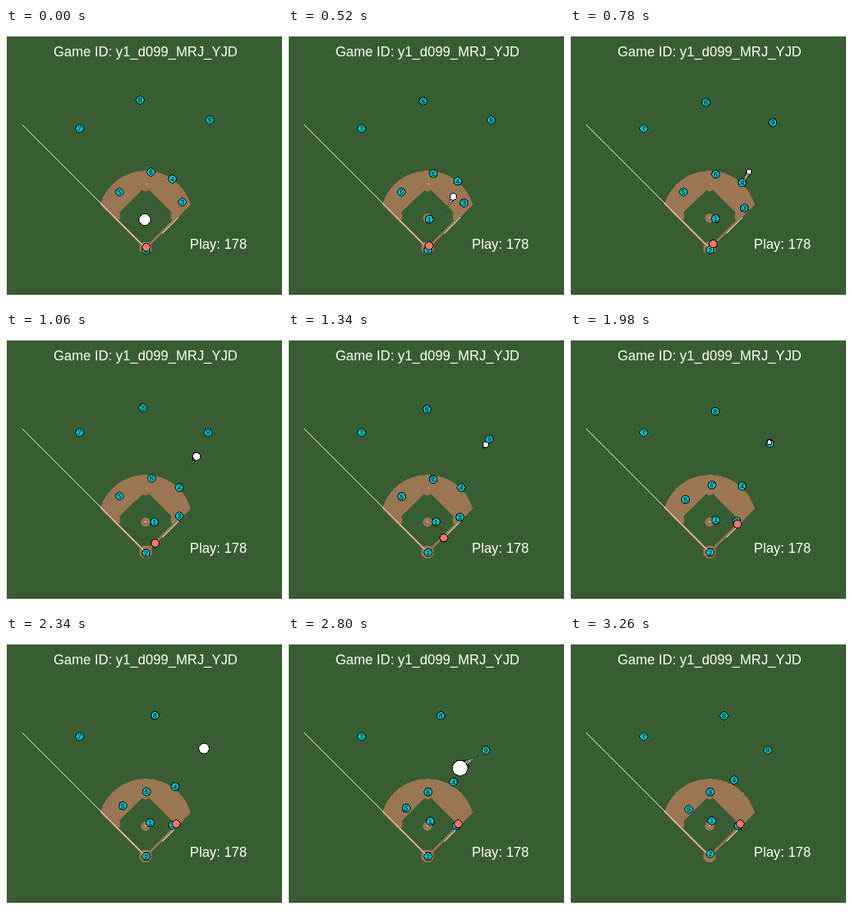
An HTML page that plays this animation: 360x360 px, repeating every 3.3 s.

```html
<!DOCTYPE html>
<html lang="en">
<head>
<meta charset="utf-8">
<title>Play 178</title>
<style>
  html, body { margin: 0; width: 100%; height: 100%; overflow: hidden; background: #fff; }
  svg { display: block; width: 100%; height: 100%; shape-rendering: crispEdges; }
  text { font-family: "Liberation Sans", Arial, sans-serif; text-anchor: middle; }
  .label { font-size: 17.85px; fill: #fff; }
  .dirt { fill: #9b7653; }
  .grass { fill: #395d33; }
  .chalk { stroke: #fff; fill: none; }
  .base { fill: #fff; }
  .man circle { fill: #00bfc4; stroke: #000; }
  .man.runner circle { fill: #f8766d; }
  .man text { font-size: 9px; }
  .ball { fill: #fff; stroke: #000; }
</style>
</head>
<body>
<svg viewBox="0 0 360 360">
  <clipPath id="infield"><path d="M123 230.4A61.5 61.5 0 0 1 241 230.4L182 289.4Z"/></clipPath>
  <rect class="grass" x="1" y="11" width="359" height="337"/>
  <path class="dirt" d="M123 230.4A61.5 61.5 0 0 1 241 230.4L182 289.4Z"/>
  <path class="grass" d="M182 207L221.2 246.2L182 285.4L142.8 246.2Z"/>
  <g class="dirt">
    <g clip-path="url(#infield)">
      <circle cx="182" cy="204.3" r="8.5"/>
      <circle cx="223.4" cy="245.6" r="8.5"/>
      <circle cx="140.6" cy="245.6" r="8.5"/>
    </g>
    <circle cx="182" cy="287" r="8.5"/>
    <circle cx="182" cy="248" r="6"/>
  </g>
  <path class="chalk" d="M21 126L182 287M204 268L225 247"/>
  <g class="base">
    <rect x="181" y="247" width="2" height="1"/>
    <rect x="183" y="203" width="1" height="1"/>
  </g>
  <text class="label" x="182" y="37">Game ID: y1_d099_MRJ_YJD</text>
  <text class="label" x="277" y="288">Play: 178</text>
  <g id="men"></g>
  <g id="flight"></g>
</svg>
<script>
const LOOP = 3300, STEP = 20, WAKE = 9;
const HIT = 130, CATCH = 1620, THROW = 2540, LAND = 3120, GONE = 3180;

const progress = (t, from, to) => Math.min(1, Math.max(0, (t - from) / (to - from)));
const ease = u => u * u * (3 - 2 * u);
const mix = (a, b, u) => a + (b - a) * u;

function make(parent, tag, attrs, text) {
  const el = document.createElementNS("http://www.w3.org/2000/svg", tag);
  for (const k in attrs) el.setAttribute(k, attrs[k]);
  if (text) el.textContent = text;
  return parent.appendChild(el);
}

// Each move is [from, to, dx, dy]; overlapping moves add up
const men = [];
function addMan(label, x, y, ...moves) {
  const g = make(document.getElementById("men"), "g", { class: label ? "man" : "man runner" });
  make(g, "circle", { r: 5.2 });
  if (label) make(g, "text", { y: 3.2 }, label);
  men.push({ g, x, y, moves });
}

addMan("1", 182, 250, [300, 1060, 11.5, -2], [1060, 3200, -8.5, -7]);
addMan("2", 182.5, 290, [520, 1500, 0.5, -2.5], [2800, 3200, 0, -3.5]);
addMan("3", 230, 227, [400, 1060, -4, 13], [1060, 2000, -8.5, 7], [2340, 2800, 2, 0.5]);
addMan("4", 217, 197, [0, 1060, 9, 6], [1620, 3200, -12, -15]);
addMan("5", 148, 214, [1060, 3260, 7, 12]);
addMan("6", 189, 188, [0, 900, 1, 3], [1060, 2500, -7, 12.5]);
addMan("7", 96, 131);
addMan("8", 175, 94, [0, 2000, 7, 9], [1060, 3200, 19, 1]);
addMan("9", 266, 120, [0, 520, -1, 0], [520, 1620, -3, 23], [1620, 2500, -4, 6]);
addMan("", 183, 286, [0, 520, 1, -2], [520, 1800, 27, -22], [1400, 2340, 11, -17]);

// Position and height-based radius: pitch, bouncing hit, carry, throw to second
function ballAt(t) {
  if (t < HIT) {
    const u = progress(t, 0, HIT);
    return [mix(181, 183, u), mix(250, 285, u), mix(7.5, 5, u)];
  }
  if (t < CATCH) {
    const u = progress(t, HIT, CATCH), s = 1 - (1 - u) ** 2;
    const bounce = Math.abs(Math.sin(3.3 * Math.PI * (1 - s)));
    return [mix(183, 261, s) - 12 * s * (1 - s), mix(285, 142, s), 3 + 2.2 * bounce];
  }
  if (t < THROW) {
    const u = ease(progress(t, CATCH, THROW));
    return [mix(261, 258, u), mix(142, 147.5, u), mix(3, 7, ease(progress(t, 2160, 2360)))];
  }
  const u = progress(t, THROW, LAND);
  return [mix(258, 183, u), mix(147.5, 203, u), mix(7, 4, u) + 4.5 * Math.sin(Math.PI * u)];
}

// Oldest wake dot first, the ball itself on top
const dots = [];
for (let age = WAKE; age >= 0; age--) {
  const q = 1 - age / (WAKE + 1);
  const el = make(document.getElementById("flight"), "circle",
    { class: "ball", opacity: q, "stroke-width": mix(0.4, 1, q) });
  dots.push({ el, age, scale: q * q });
}

function draw(t) {
  for (const { g, x, y, moves } of men) {
    let px = x, py = y;
    for (const [from, to, dx, dy] of moves) {
      const u = ease(progress(t, from, to));
      px += dx * u;
      py += dy * u;
    }
    g.setAttribute("transform", `translate(${px.toFixed(2)} ${py.toFixed(2)})`);
  }
  for (const { el, age, scale } of dots) {
    const past = t - age * STEP;
    el.setAttribute("visibility", past >= 0 && t < GONE ? "visible" : "hidden");
    const [x, y, r] = ballAt(Math.max(0, past));
    el.setAttribute("cx", x);
    el.setAttribute("cy", y);
    el.setAttribute("r", r * scale);
  }
}

const start = performance.now();
function tick() {
  const t = (performance.now() - start) % LOOP;
  draw(Math.min(Math.floor(t / STEP) * STEP, 3260));
  requestAnimationFrame(tick);
}
draw(0);
requestAnimationFrame(tick);
</script>
</body>
</html>
```
